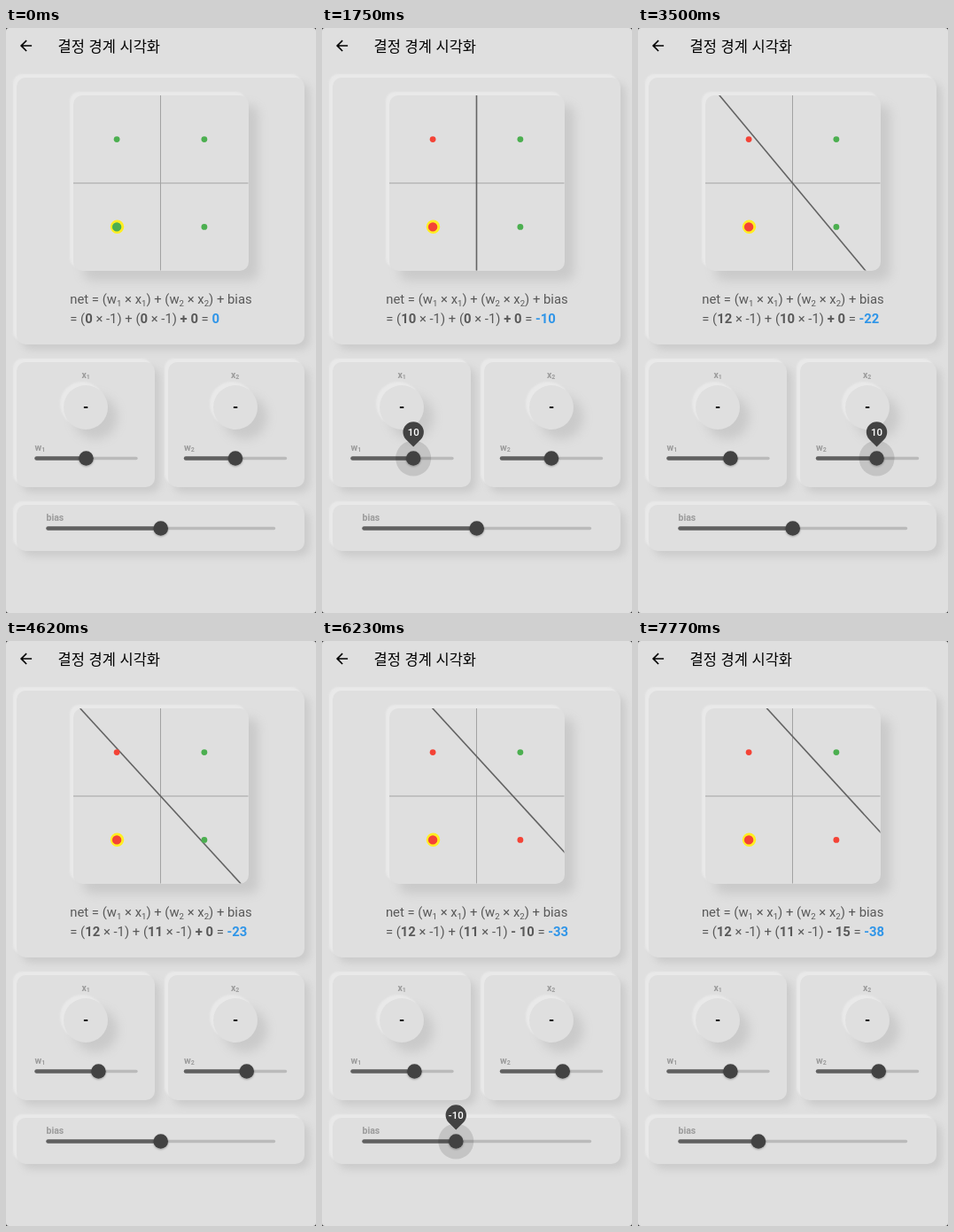
An HTML page that plays this animation: 350 px wide and 660 px high, repeating every 8 s.

```html
<!DOCTYPE html>
<html lang="ko">
<head>
<meta charset="utf-8">
<title>결정 경계 시각화</title>
<style>
  html, body { margin: 0; width: 100%; height: 100%; overflow: hidden; background: #333; }
  #stage {
    position: relative; width: 350px; height: 660px; overflow: hidden;
    border-radius: 3px; background: #dfdfdf; font-family: Roboto, sans-serif;
  }
  .clay {
    position: absolute; box-sizing: border-box; border-radius: 10px; background: #dfdfdf;
    box-shadow: -4px -4px 2px #e9e9e9, 6px 6px 9px #cbcbcb;
  }
  .deep { box-shadow: -4px -4px 2px #e9e9e9, 11px 11px 12px #cacaca; }
  .knob { border-radius: 50%; }
  svg { position: absolute; left: 0; top: 0; }
  #title { font: 16.5px "Noto Sans CJK KR", "Noto Sans CJK", sans-serif; }
  .tag { font-size: 10.5px; font-weight: 700; fill: #9b9b9b; }
  .tag .sub { font-size: 7px; }
  .dash { font-size: 16px; font-weight: 700; text-anchor: middle; }
  #formula {
    position: absolute; left: 0; top: 295px; width: 350px; display: flex; justify-content: center;
    font-size: 14.85px; line-height: 22px; color: #595959; white-space: pre;
  }
  #formula i { font-style: normal; font-size: 9.6px; line-height: 0; position: relative; top: 2.5px; }
  #net { color: #2f95e8; }
</style>
</head>
<body>
<div id="stage">
  <div class="clay" style="left:12px;top:56px;width:325px;height:301px"></div>
  <div class="clay deep" style="left:76px;top:76px;width:197.5px;height:197.5px"></div>
  <div class="clay" style="left:12px;top:377px;width:156px;height:141px"></div>
  <div class="clay" style="left:183px;top:377px;width:154px;height:141px"></div>
  <div class="clay" style="left:12px;top:538px;width:325px;height:52px"></div>
  <div class="clay deep knob" style="left:65px;top:403px;width:50px;height:50px"></div>
  <div class="clay deep knob" style="left:234px;top:403px;width:50px;height:50px"></div>

  <div id="formula"><div>net = (w<i>1</i> × x<i>1</i>) + (w<i>2</i> × x<i>2</i>) + bias
= (<b id="v1"></b> × -1) + (<b id="v2"></b> × -1) <b id="vb"></b> = <b id="net"></b></div></div>

  <svg id="scene" width="350" height="660" viewBox="0 0 350 660">
    <defs>
      <clipPath id="plot"><rect x="76" y="76" width="197.5" height="197.5" rx="9"/></clipPath>
      <filter id="soft" x="-50%" y="-50%" width="200%" height="200%">
        <feDropShadow dx="0" dy="1" stdDeviation="1" flood-opacity=".3"/>
      </filter>
    </defs>
    <path transform="translate(12.7 10.2) scale(.82)"
      d="M20 11H7.83l5.59-5.59L12 4l-8 8 8 8 1.41-1.41L7.83 13H20z"/>
    <text id="title" x="58.5" y="27">결정 경계 시각화</text>

    <g clip-path="url(#plot)">
      <path d="M174.5 76V274M76 175H274" stroke="#a2a2a2" fill="none"/>
      <line id="border" stroke="#646464" stroke-width="1.6"/>
      <circle cx="125.5" cy="224.3" r="7.7" fill="#ffee22"/>
      <g id="dots"></g>
    </g>

    <text class="tag" x="85.5" y="395">x<tspan class="sub" dy="1">1</tspan></text>
    <text class="tag" x="254" y="395">x<tspan class="sub" dy="1">2</tspan></text>
    <text class="tag" x="32.5" y="477">w<tspan class="sub" dy="1">1</tspan></text>
    <text class="tag" x="201" y="477">w<tspan class="sub" dy="1">2</tspan></text>
    <text class="tag" x="45.5" y="555.5">bias</text>
    <text class="dash" x="90" y="433">-</text>
    <text class="dash" x="259" y="433">-</text>
  </svg>
</div>

<script>
const LOOP = 8000, TICK = 70;
const MOVE_MS = 75, PRESS_MS = 100;
const $ = id => document.getElementById(id);
const clamp = v => Math.min(1, Math.max(0, v));

function add(parent, tag, attrs) {
  const el = document.createElementNS("http://www.w3.org/2000/svg", tag);
  set(el, attrs);
  return parent.appendChild(el);
}
function set(el, attrs) {
  for (const k in attrs) el.setAttribute(k, attrs[k]);
}

// Each slider runs from -50 to 50; steps are [time, value], press is [down, up].
function slider(x0, x1, y, press, steps) {
  const g = add($("scene"), "g", { transform: `translate(0 ${y})` });
  const track = { y1: 0, y2: 0, "stroke-linecap": "round" };
  add(g, "line", { ...track, x1: x0 + 1.5, x2: x1 - 1.5, stroke: "#bababa", "stroke-width": 3.4 });
  const active = add(g, "line", { ...track, x1: x0 + 2, stroke: "#606060", "stroke-width": 4.4 });
  const handle = add(g, "g", {});
  const halo = add(handle, "circle", { fill: "#000", "fill-opacity": .12 });
  add(handle, "circle", { r: 8.3, fill: "#424242", filter: "url(#soft)" });
  const drop = add(handle, "g", {});
  add(drop, "path", { d: "M0 0L-8.3-8.3A11.7 11.7 0 1 1 8.3-8.3Z", fill: "#424242" });
  const label = add(drop, "text", {
    y: -12.6, fill: "#fff", "font-size": 11.5, "font-weight": 500, "text-anchor": "middle"
  });

  return t => {
    let value = 0, pos = 0;
    for (const [at, next] of steps) {
      if (t < at) break;
      pos = value + (next - value) * clamp((t - at) / MOVE_MS);
      value = next;
    }
    const [down, up] = press;
    const open = clamp((t - down) / PRESS_MS) - clamp((t - up) / PRESS_MS);
    const x = (x0 + x1) / 2 + pos * (x1 - x0) / 100;
    set(active, { x2: x });
    set(handle, { transform: `translate(${x} 0)` });
    set(halo, { r: 20 * open });
    set(drop, { transform: `translate(0 -13) scale(${open})` });
    label.textContent = value;
    return value;
  };
}

const readW1 = slider(32.5, 148.5, 485.5, [1158, 2490], [
  [1162, 7], [1305, 9], [1345, 11], [1385, 12], [1464, 11], [1744, 10], [2094, 11], [2304, 12]
]);
const readW2 = slider(201, 317, 485.5, [3260, 4520], [
  [3265, 5], [3340, 8], [3415, 9], [3494, 10], [4404, 11]
]);
const readBias = slider(45.5, 304, 564.5, [5640, 7670], [
  [5735, -1], [5800, -2], [5876, -4], [5945, -6], [6015, -7], [6085, -8], [6155, -9],
  [6224, -10], [6574, -11], [6700, -12], [6785, -13], [6924, -14], [7134, -15]
]);

const CX = 174.5, CY = 175, UNIT = 49.4;
const dots = [[-1, 1], [1, 1], [-1, -1], [1, -1]].map(([x, y]) => ({
  x, y,
  el: add($("dots"), "circle", {
    cx: CX + x * UNIT, cy: CY - y * UNIT, r: x + y === -2 ? 5.2 : 3.4
  })
}));

function drawBorder(w1, w2, b) {
  const n = w1 * w1 + w2 * w2;
  $("border").style.display = n ? "" : "none";
  if (!n) return;
  const x = CX - UNIT * b * w1 / n, y = CY + UNIT * b * w2 / n;
  const k = 400 / Math.sqrt(n);
  set($("border"), { x1: x - w2 * k, y1: y - w1 * k, x2: x + w2 * k, y2: y + w1 * k });
}

function draw() {
  const now = performance.now() % LOOP;
  const t = Math.floor(now / TICK) * TICK;
  const w1 = readW1(t), w2 = readW2(t), b = readBias(t);
  for (const d of dots) {
    set(d.el, { fill: w1 * d.x + w2 * d.y + b < 0 ? "#f44336" : "#4caf50" });
  }
  drawBorder(w1, w2, b);
  $("v1").textContent = w1;
  $("v2").textContent = w2;
  $("vb").textContent = (b < 0 ? "- " : "+ ") + Math.abs(b);
  $("net").textContent = b - w1 - w2;
  requestAnimationFrame(draw);
}
draw();
</script>
</body>
</html>
```
